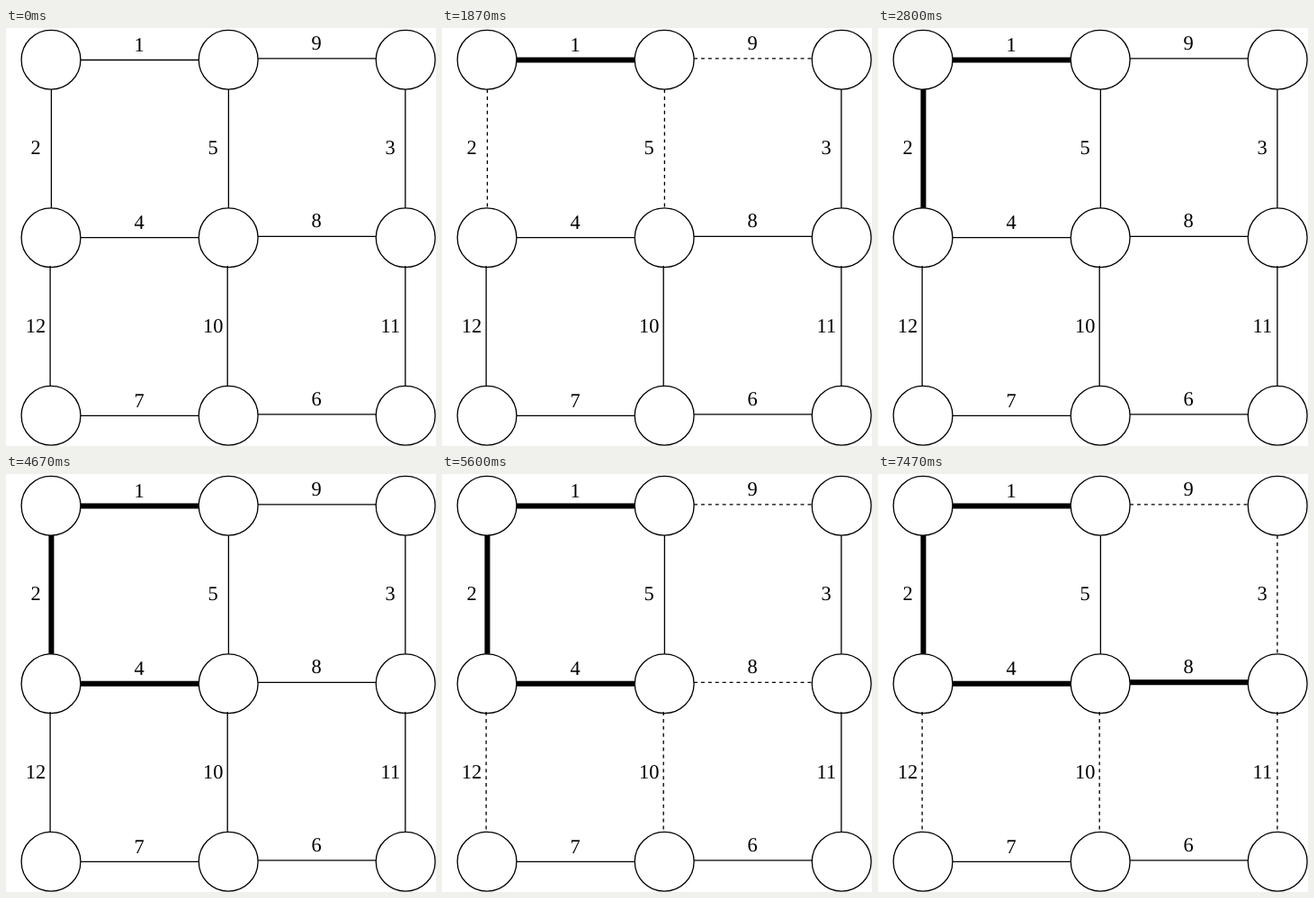
Animation of 478 by 464 pixels, one loop 8000 ms. Source, as an HTML page:

```html
<!DOCTYPE html>
<html lang="en">
<head>
<meta charset="utf-8">
<title>Weighted grid graph</title>
<style>
  html, body { margin: 0; width: 100%; height: 100%; overflow: hidden; background: #fff; }
  svg { display: block; width: 100%; height: 100%; }
  circle { fill: #fff; stroke: #000; stroke-width: 1.32; }
  line { stroke: #000; stroke-width: 1.32; }
  line.dashed { stroke-dasharray: 3.95; }
  line.bold { stroke-width: 6; }
  text {
    font: 22.4px "Liberation Serif", "Times New Roman", serif;
    text-anchor: middle;
    text-rendering: geometricPrecision;
  }
</style>
</head>
<body>
<svg id="graph" viewBox="0 0 478 464"></svg>
<script>
  const LOOP = 8000;
  const RADIUS = 32.9;
  const COLUMNS = [50, 247.2, 444.2];
  const ROWS = [35.2, 232.7, 430.2];
  const graph = document.getElementById("graph");
  const edges = {};

  function add(tag, attributes, content = "") {
    const node = document.createElementNS("http://www.w3.org/2000/svg", tag);
    for (const [key, value] of Object.entries(attributes)) node.setAttribute(key, value);
    node.textContent = content;
    return graph.appendChild(node);
  }

  function addEdge(weight, x1, y1, x2, y2, labelX, labelY) {
    edges[weight] = add("line", { x1, y1, x2, y2 });
    add("text", { x: labelX, y: labelY + 7.5 }, weight);
  }

  function addHorizontal(weight, column, y) {
    const left = COLUMNS[column];
    addEdge(weight, left + RADIUS, y, COLUMNS[column + 1] - RADIUS, y, left + 98, y - 17.4);
  }

  // The lower edges start slightly inside their circle.
  function addVertical(weight, x, row, labelX) {
    const top = ROWS[row];
    addEdge(weight, x, top + RADIUS - row * 1.5, x, ROWS[row + 1] - RADIUS, labelX, top + 97.6);
  }

  for (const cy of ROWS) {
    for (const cx of COLUMNS) add("circle", { cx, cy, r: RADIUS });
  }

  addHorizontal(1, 0, 35.5);
  addHorizontal(9, 1, 33.8);
  addHorizontal(4, 0, 232.7);
  addHorizontal(8, 1, 231.3);
  addHorizontal(7, 0, 430.4);
  addHorizontal(6, 1, 428.8);
  addVertical(2, 50.4, 0, 33);
  addVertical(5, 247.4, 0, 230);
  addVertical(3, 443.9, 0, 427);
  addVertical(12, 49.1, 1, 33);
  addVertical(10, 246.2, 1, 230.3);
  addVertical(11, 443.9, 1, 427.3);

  // Each step either weighs the candidate edges or takes the lightest one.
  const steps = [
    { at: 0, bold: [], dashed: [] },
    { at: 930, bold: [1], dashed: [] },
    { at: 1870, bold: [1], dashed: [2, 5, 9] },
    { at: 2800, bold: [1, 2], dashed: [] },
    { at: 3730, bold: [1, 2], dashed: [4, 5, 9, 12] },
    { at: 4670, bold: [1, 2, 4], dashed: [] },
    { at: 5600, bold: [1, 2, 4], dashed: [8, 9, 10, 12] },
    { at: 6530, bold: [1, 2, 4, 8], dashed: [] },
    { at: 7470, bold: [1, 2, 4, 8], dashed: [3, 9, 10, 11, 12] }
  ];

  let shown;
  const start = performance.now();

  function draw(now) {
    const time = Math.max(0, now - start) % LOOP;
    const step = steps.filter(({ at }) => at <= time).pop();
    if (step !== shown) {
      shown = step;
      for (const [weight, edge] of Object.entries(edges)) {
        edge.classList.toggle("bold", step.bold.includes(+weight));
        edge.classList.toggle("dashed", step.dashed.includes(+weight));
      }
    }
    requestAnimationFrame(draw);
  }

  draw(start);
</script>
</body>
</html>
```
